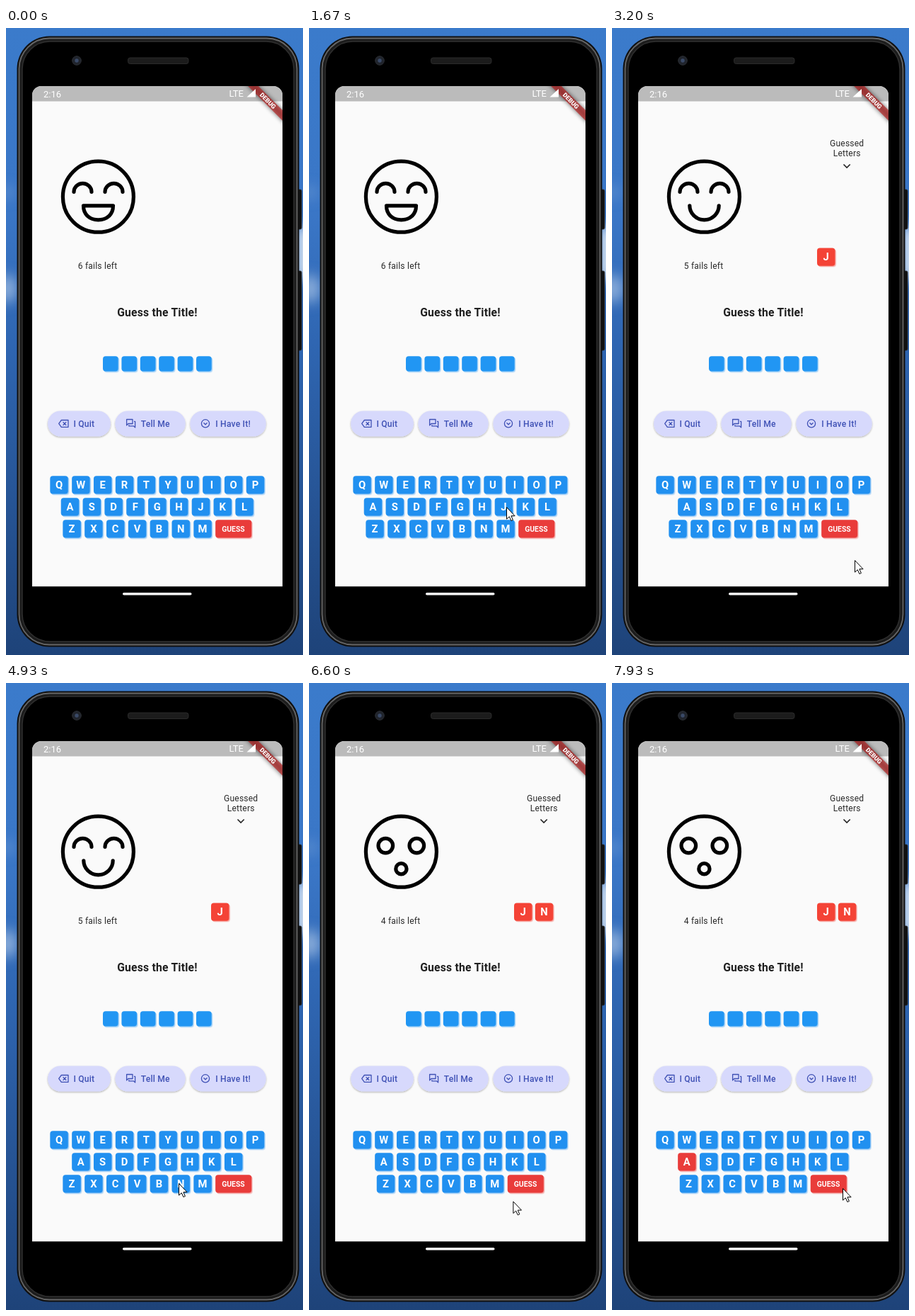
Recreate the animation shown at these times as an HTML page. Size 420 px wide and 885 px high, loop 8 s.

```html
<!DOCTYPE html>
<html lang="en">
<head>
<meta charset="utf-8">
<title>Guess the Title</title>
<style>
  html, body { margin: 0; width: 100%; height: 100%; overflow: hidden; background: #2c62b0; }
  svg { display: block; width: 100vw; height: 100vh; font-family: Roboto, sans-serif; }
  .small { font-size: 12.06px; letter-spacing: .215px; fill: #2a2a2a; text-anchor: middle; }
  .title { font-size: 15.7px; font-weight: 600; letter-spacing: .22px; fill: #1f1f1f; text-anchor: middle; }
  .pill { font-size: 12.1px; font-weight: 500; letter-spacing: .2px; fill: #3f51b5; }
  .key { font-size: 14.8px; font-weight: 700; fill: #fff; text-anchor: middle; }
  .guess { font-size: 10.4px; font-weight: 700; fill: #fff; text-anchor: middle; }
  .status { font-size: 13px; fill: #fff; }
  .icon { fill: none; stroke: #3f51b5; stroke-width: 1.3; stroke-linejoin: round; }
  .ink { fill: none; stroke: #000; stroke-width: 5.2; stroke-linecap: round; stroke-linejoin: round; }
</style>
</head>
<body>
<svg viewBox="0 0 420 885" preserveAspectRatio="none">
  <defs>
    <linearGradient id="sky" x2="0" y2="1">
      <stop offset="0" stop-color="#3b7bcb"/>
      <stop offset=".3" stop-color="#3a76c6"/>
      <stop offset=".5" stop-color="#2f66b2"/>
      <stop offset="1" stop-color="#1e4379"/>
    </linearGradient>
    <filter id="soft" x="-300%" y="-100%" width="700%" height="300%"><feGaussianBlur stdDeviation="9"/></filter>
    <filter id="blur" x="-20%" y="-120%" width="140%" height="340%"><feGaussianBlur stdDeviation="3"/></filter>
    <filter id="lift" x="-10%" y="-20%" width="120%" height="150%">
      <feDropShadow dx="0" dy="1.2" stdDeviation=".8" flood-color="#000" flood-opacity=".3"/>
    </filter>
    <clipPath id="screen"><path d="M37 788.3V95a13 13 0 0 1 13-13H378a13 13 0 0 1 13 13V788.3Z"/></clipPath>
  </defs>

  <rect width="420" height="885" fill="url(#sky)"/>
  <g fill="#a9c3e4" filter="url(#soft)">
    <ellipse cx="2" cy="368" rx="14" ry="20" opacity=".75"/>
    <ellipse cx="2" cy="232" rx="10" ry="10" opacity=".3"/>
    <rect x="412" y="280" width="30" height="75" fill="#e4edf6"/>
  </g>

  <g fill="#111" stroke="#2c2c2c" stroke-width=".8">
    <rect x="410" y="228" width="8" height="56" rx="2"/>
    <rect x="410" y="343" width="8" height="112" rx="2"/>
  </g>
  <rect x="15.5" y="11.5" width="399" height="862" rx="46" fill="#101010"/>
  <rect x="18.5" y="14.5" width="393" height="856" rx="43" fill="#1c1c1c" stroke="#666" stroke-width="1.8"/>
  <rect x="23" y="19" width="384" height="847" rx="39" fill="#000" stroke="#303030" stroke-width="1.4"/>
  <circle cx="100" cy="46" r="6.3" fill="#20242c" stroke="#2d2f34"/>
  <circle cx="100" cy="46" r="2.7" fill="#3a4a68"/>
  <rect x="172.5" y="42" width="85.5" height="8.5" rx="3" fill="#1c1c1c" stroke="#2b2b2b"/>

  <g clip-path="url(#screen)">
    <rect x="37" y="82" width="354" height="707" fill="#fafafa"/>
    <rect x="37" y="82" width="354" height="21.5" fill="#bbb"/>
    <g transform="translate(391 82) rotate(45)">
      <rect x="-40" y="24.1" width="80" height="10.4" opacity=".55" filter="url(#blur)"/>
      <rect x="-40" y="24.1" width="80" height="10.4" fill="#b71c1c" opacity=".65"/>
      <text y="32.4" font-size="8.8" font-weight="900" fill="#fff" text-anchor="middle">DEBUG</text>
    </g>
  </g>
  <text class="status" x="53" y="97.6">2:16</text>
  <text class="status" x="315.5" y="97.3">LTE</text>
  <path d="M340.5 97.5H353V86Z" fill="#fff"/>
  <rect x="165" y="797" width="97.5" height="3.6" rx="1.8" fill="#fff"/>

  <text class="title" x="214" y="407">Guess the Title!</text>
  <g id="tiles"></g>

  <g fill="#d7d9fc" filter="url(#lift)">
    <rect x="59" y="540.5" width="89" height="36" rx="18"/>
    <rect x="154.3" y="540.5" width="99.5" height="36" rx="18"/>
    <rect x="260.3" y="540.5" width="107.5" height="36" rx="18"/>
  </g>
  <g class="pill">
    <text x="95.5" y="562.8">I Quit</text>
    <text x="190.8" y="562.8">Tell Me</text>
    <text x="296.3" y="562.8">I Have It!</text>
  </g>
  <g class="icon">
    <path d="M78.3 553.5H88V563.3H78.3L74.7 558.4ZM80.6 556.1l4.6 4.6M85.2 556.1l-4.6 4.6"/>
    <path d="M170.6 552.5h8.4v6h-6.2l-2.2 2.2ZM181 555.3h1.6v8.6l-2.2-2.1h-6.6v-1.6"/>
    <circle cx="282" cy="558.3" r="5.6"/>
    <path d="M279.5 557.2l2.5 2.5 2.5-2.5"/>
  </g>

  <g id="play"></g>
  <path id="cursor" d="M0 0V16.6L3.8 13.2 6.4 19 8.9 17.9 6.4 12.2H11.6Z" fill="#fff" stroke="#000" stroke-linejoin="round"/>
</svg>
<script>
const LOOP = 8000, FPS = 15;
const BLUE = '#2190f0', RED = '#e93c3a', BRIGHT = '#f44336';
const KEY = 25.4, STEP = 30.83, MID = 213.75;
const $ = id => document.getElementById(id);

// Pointer moves: start tick, end tick, x, y
const START = [406, 872];
const MOVES = [
  [1, 13, 297, 755], [13, 14, 297, 756], [18, 25, 279, 676],
  [29, 36, 332, 706], [42, 48, 343, 751], [62, 74, 244, 706],
  [76, 82, 331, 725], [84, 86, 315, 732], [88, 90, 315, 741],
  [97, 106, 104, 665], [106, 108, 107, 669],
  [111, 117, 328, 718], [117, 119, 326, 713]
];

// Guesses: letter, selected, button pressed, result shown, new face shown
const GUESSES = [['J', 29, 42, 45, 46], ['N', 76, 85, 88, 89], ['A', 111, 999, 999, 999]];

const EYES = '<path d="M96 231.3a12.5 12 0 0 1 25 0M140 231.3a12.5 12 0 0 1 25 0"/>';
const FACES = [
  EYES + '<path d="M109.5 250.8H151.5C151.5 263 143 270.8 130.5 270.8S109.5 263 109.5 250.8Z"/>',
  EYES + '<path d="M109.8 250.8a20.7 20 0 0 0 41.4 0"/>',
  '<circle cx="108.3" cy="229.6" r="10.3"/><circle cx="152.3" cy="229.6" r="10.3"/><circle cx="130.4" cy="262.2" r="7.6"/>'
];

function tile(x, y, w, h, fill) {
  const box = (d, extra) =>
    `<rect x="${x + d}" y="${y + d}" width="${w}" height="${h}" rx="4" fill="${fill}" ${extra}/>`;
  return box(1.8, 'opacity=".2"') + box(1, 'opacity=".35"') + box(0, '');
}

function key(ch, x, y, fill) {
  return tile(x, y, KEY, KEY, fill) +
    `<text class="key" x="${x + KEY / 2}" y="${y + 18}">${ch}</text>`;
}

function row(chars, y, picked, tail = 0) {
  const width = chars.length * STEP + (tail || KEY - STEP);
  const x = MID - width / 2;
  const html = [...chars].map((ch, i) =>
    key(ch, x + i * STEP, y, ch === picked ? RED : BLUE)).join('');
  return { html, end: x + chars.length * STEP };
}

function scene(n) {
  const done = GUESSES.filter(g => n >= g[3]);
  const now = GUESSES.find(g => n >= g[1] && n < g[3]);
  const picked = now && now[0];
  const pressed = now && n >= now[2];
  const left = s => [...s].filter(ch => !done.some(g => g[0] === ch)).join('');

  const last = done[done.length - 1];
  let html = '';
  if (!last || n >= last[4])
    html += `<g class="ink"><circle cx="130.4" cy="238.2" r="50"/>${FACES[done.length]}</g>`;
  html += `<text class="small" x="129.5" y="340">${6 - done.length} fails left</text>`;

  if (last) {
    html += '<text class="small" x="332.2" y="166.5">Guessed</text>' +
      '<text class="small" x="332.2" y="181">Letters</text>' +
      '<path d="M327.5 192.5l4.6 4.6 4.6-4.6" fill="none" stroke="#222" stroke-width="1.6"/>';
    done.forEach((g, i) => html += key(g[0], 290 + i * 29.8, 310.4, BRIGHT));
  }

  html += row('QWERTYUIOP', 632.2, picked).html + row(left('ASDFGHJKL'), 663.2, picked).html;
  const bottom = row(left('ZXCVBNM'), 694.2, picked, 51), x = bottom.end;
  html += bottom.html + tile(x, 694.2, 51, KEY, RED);
  if (pressed)
    html += `<rect x="${x}" y="694.2" width="51" height="${KEY}" rx="4" fill="#fff" opacity=".16"/>`;
  return html + `<text class="guess" x="${x + 25.3}" y="710.6">GUESS</text>`;
}

function pointer(n) {
  let [x, y] = START;
  for (const [a, b, tx, ty] of MOVES) {
    const p = Math.min(1, Math.max(0, (n - a) / (b - a)));
    const e = p * p * (3 - 2 * p);
    x += (tx - x) * e;
    y += (ty - y) * e;
  }
  return [x, y];
}

$('tiles').innerHTML = Array.from({ length: 6 }, (_, i) =>
  tile(137 + i * 26.4, 463.2, 21.6, 21.4, '#2196f3')).join('');

let shown = -1, markup = '';
function draw(ms) {
  const n = Math.floor((ms % LOOP + 4) * FPS / 1000) % (LOOP * FPS / 1000);
  if (n !== shown) {
    shown = n;
    const html = scene(n);
    if (html !== markup) $('play').innerHTML = markup = html;
    const [x, y] = pointer(n);
    $('cursor').setAttribute('transform', `translate(${x + .5} ${y + .5})`);
    $('cursor').setAttribute('visibility', n ? 'visible' : 'hidden');
  }
}

const t0 = performance.now();
function tick() {
  draw(performance.now() - t0);
  requestAnimationFrame(tick);
}
tick();
</script>
</body>
</html>
```
